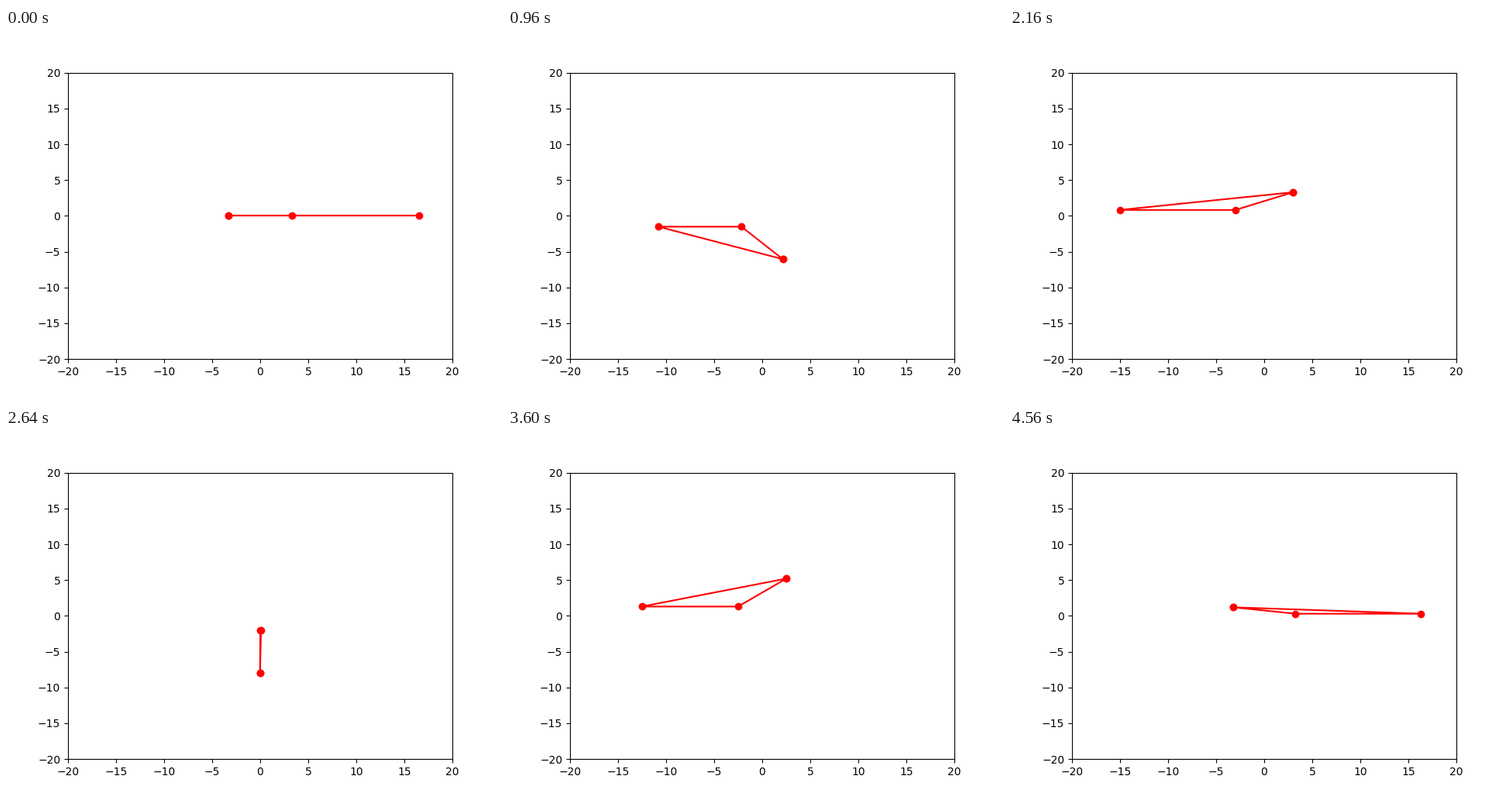
Recreate the animation shown at these times as a matplotlib script. Size 640 px wide and 480 px high, loop 4.8 s.

```python
import numpy as np
import matplotlib.pyplot as plt
from matplotlib.animation import FuncAnimation

FRAMES, INTERVAL = 20, 240

# Closed triangle: last vertex repeats the first
TRI_X = np.array([-1, 1, 5, -1])
TRI_Y = np.array([4, 1, 1, 4])

fig, ax = plt.subplots(figsize=(6.4, 4.8), dpi=100)
ax.set_xlim(-20, 20)
ax.set_ylim(-20, 20)
line, = ax.plot([], [], "ro-")


def update(i):
    # The angle advances one radian per step
    line.set_data(3.3 * np.cos(i) * TRI_X, 2 * np.sin(i) * TRI_Y)
    return line,


anim = FuncAnimation(fig, update, frames=FRAMES, interval=INTERVAL,
                     repeat=True, repeat_delay=0)
plt.show()
```
